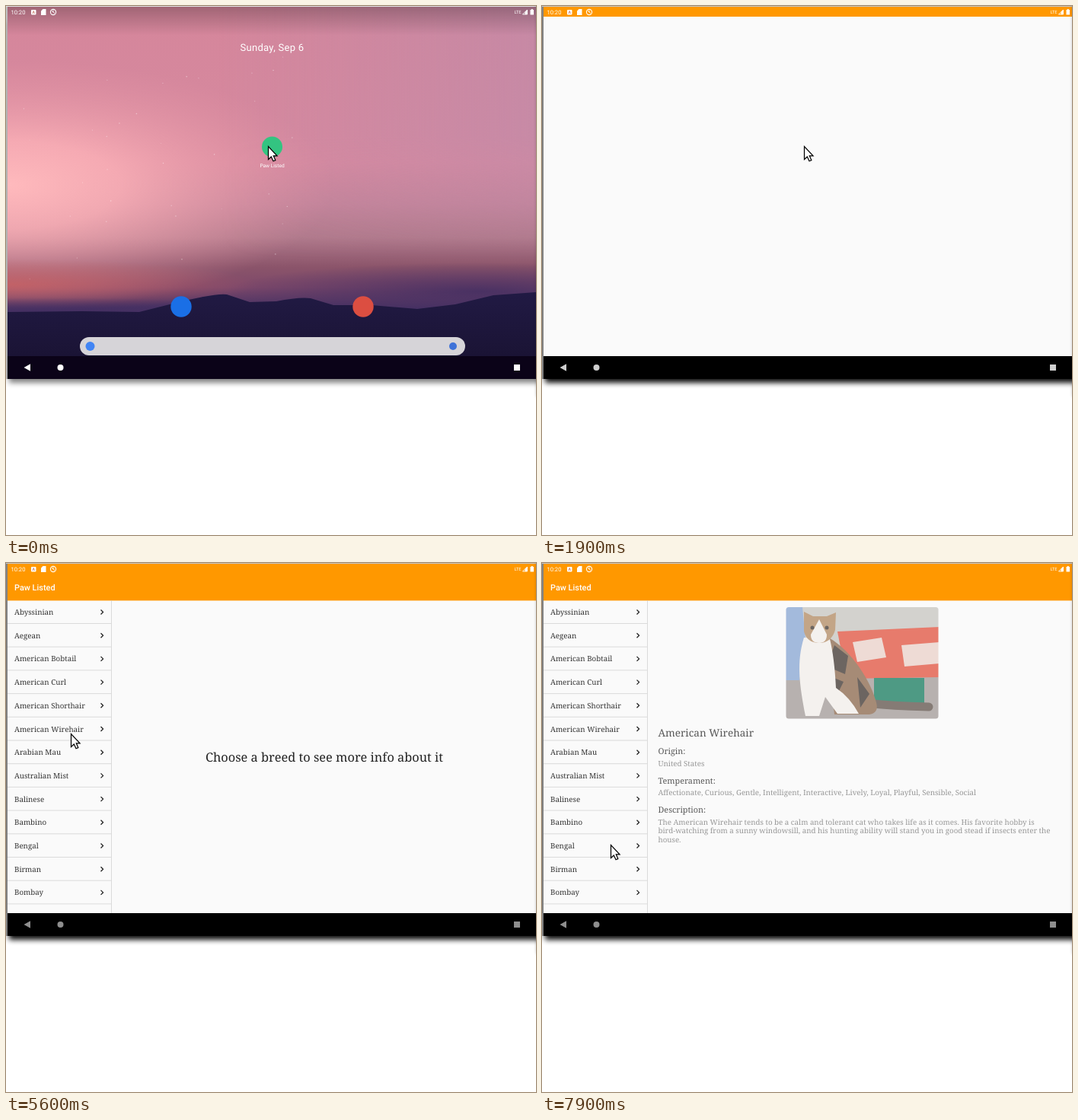
Recreate the animation shown at these times as an HTML page. Size 696 by 695 pixels, loop 8 s.

```html
<!DOCTYPE html>
<html lang="en">
<head>
<meta charset="utf-8">
<title>Paw Listed</title>
<style>
  html, body { margin: 0; width: 100%; height: 100%; overflow: hidden; background: #fff; }
  svg { display: block; width: 696px; height: 695px; }
  text { text-rendering: geometricPrecision; white-space: pre; }
  .ui { font-family: Roboto, sans-serif; }
  .serif { font-family: "Noto Serif", serif; }
  .spinner { fill: none; stroke: #64748c; stroke-width: 2.2; }
</style>
</head>
<body>
<svg viewBox="0 0 696 695">
  <defs>
    <linearGradient id="sky" x2="0" y2="1">
      <stop offset="0" stop-color="#d5869b"/>
      <stop offset=".42" stop-color="#d6899f"/>
      <stop offset=".53" stop-color="#c4849a"/>
      <stop offset=".62" stop-color="#b17a8c"/>
      <stop offset=".7" stop-color="#8b546a"/>
      <stop offset=".755" stop-color="#7d486a"/>
      <stop offset=".81" stop-color="#463163"/>
    </linearGradient>
    <linearGradient id="mauve">
      <stop offset=".4" stop-color="#b98cae" stop-opacity="0"/>
      <stop offset="1" stop-color="#b98cae" stop-opacity=".5"/>
    </linearGradient>
    <linearGradient id="mauveMask" x2="0" y2="1">
      <stop offset=".35" stop-color="#fff"/>
      <stop offset=".68" stop-color="#000"/>
    </linearGradient>
    <mask id="upper"><rect width="696" height="490" fill="url(#mauveMask)"/></mask>
    <linearGradient id="scrimFill" x2="0" y2="1">
      <stop offset="0" stop-opacity=".25"/>
      <stop offset="1" stop-opacity="0"/>
    </linearGradient>
    <linearGradient id="hill" x2="0" y2="1">
      <stop offset="0" stop-color="#211a44"/>
      <stop offset="1" stop-color="#18112f"/>
    </linearGradient>
    <radialGradient id="glow">
      <stop offset="0" stop-color="#ffbabd"/>
      <stop offset=".35" stop-color="#fdb2b8" stop-opacity=".8"/>
      <stop offset="1" stop-color="#e898a6" stop-opacity="0"/>
    </radialGradient>
    <radialGradient id="ember">
      <stop offset="0" stop-color="#cc6262" stop-opacity=".8"/>
      <stop offset="1" stop-color="#cc6262" stop-opacity="0"/>
    </radialGradient>
    <radialGradient id="dusk">
      <stop offset="0" stop-color="#452f62" stop-opacity=".9"/>
      <stop offset="1" stop-color="#452f62" stop-opacity="0"/>
    </radialGradient>
    <filter id="soft" x="-20%" y="-20%" width="140%" height="140%"><feGaussianBlur stdDeviation="3.600"/></filter>
    <filter id="edge" x="-200%" y="-5%" width="500%" height="110%"><feGaussianBlur stdDeviation="2.500"/></filter>
    <clipPath id="screen"><rect x="2" y="1" width="694" height="489"/></clipPath>
    <clipPath id="tapRow"><rect x="2" y="203" width="136" height="30"/></clipPath>
    <clipPath id="photo"><rect x="320.500" y="58" width="200" height="146.500" rx="3.500"/></clipPath>
  </defs>

  <rect id="shadow" x="4" y="20" width="720" height="475" filter="url(#soft)"/>
  <g id="frame">
    <path d="M0 0H2V490H0Z" fill="#808080"/>
    <path d="M0 0H696V1H0Z" fill="#c4c4c4"/>
  </g>

  <g clip-path="url(#screen)">
    <g id="wallpaper">
      <rect width="696" height="490" fill="url(#sky)"/>
      <rect width="696" height="490" fill="url(#mauve)" mask="url(#upper)"/>
      <ellipse cx="0" cy="235" rx="430" ry="165" fill="url(#glow)"/>
      <ellipse cx="0" cy="366" rx="330" ry="34" fill="url(#ember)"/>
      <ellipse cx="620" cy="375" rx="330" ry="38" fill="url(#dusk)"/>
      <ellipse cx="60" cy="402" rx="300" ry="19" fill="url(#dusk)"/>
      <g id="stars" fill="#fff" opacity=".45"></g>
      <path fill="url(#hill)" d="M0 402 100 401 175 402 215 392 240 386Q280 377 290 379L320 389 355 388Q385 382 400 384L430 393 480 393 540 398 590 392 640 380 696 376V490H0Z"/>
      <rect id="scrim" width="696" height="38" fill="url(#scrimFill)"/>
    </g>

    <g id="home">
      <text class="ui" x="349.500" y="58.500" font-size="13" letter-spacing=".3" text-anchor="middle" fill="#fff">Sunday, Sep 6</text>
      <circle cx="349.500" cy="185" r="13.500" fill="#33c481"/>
      <text class="ui" x="349.500" y="212" font-size="6.600" text-anchor="middle" fill="#fff">Paw Listed</text>
      <circle cx="230" cy="395" r="13.700" fill="#1a6fe6"/>
      <circle cx="469" cy="395" r="13.700" fill="#dc4e41"/>
      <rect x="97" y="435" width="506" height="24" rx="12" fill="#d6d4d8"/>
      <circle cx="110.500" cy="447" r="6" fill="#4285f4"/>
      <circle cx="587" cy="447" r="5" fill="#3f72d8"/>
    </g>

    <g id="app">
      <rect x="2" y="1" width="694" height="40" rx="13" fill="#ff9800"/>
      <rect x="2" y="14" width="694" height="446.500" fill="#fafafa"/>
      <rect x="2" y="460" width="694" height="30"/>
      <rect id="barTop" x="2" width="694" height="14" fill="#ff9800"/>
      <g id="toolbar">
        <rect x="2" y="13" width="694" height="36.400" fill="#ff9800"/>
        <text class="ui" x="11" y="36.300" font-size="10.900" font-weight="500" fill="#fff">Paw Listed</text>
      </g>
      <g id="lines" stroke="#c8c8c8" stroke-width=".62"><path d="M138.500 49V460"/></g>
      <g clip-path="url(#tapRow)"><circle id="ripple" cx="85" cy="225" r="105"/></g>
      <g id="list" class="serif" font-size="9.780" fill="#333"></g>
      <text id="hint" class="serif" x="418" y="261" font-size="16.350" text-anchor="middle" fill="#222">Choose a breed to see more info about it</text>
      <g id="details" class="serif">
        <g clip-path="url(#photo)">
          <rect x="320" y="58" width="202" height="148" fill="#c6c4bf"/>
          <path d="M320 150H522V206H320Z" fill="#a09996"/>
          <path d="M320 58H342L346 100 338 154H320Z" fill="#86a4d2"/>
          <path d="M388 90 522 84V150L400 152Z" fill="#e0503c"/>
          <path d="M408 104 446 98 452 124 414 130ZM472 108 522 104V132L476 136Z" fill="#ead0c8"/>
          <path d="M436 151H502V186H436Z" fill="#157a5c"/>
          <path d="M425 184Q460 188 508 189" fill="none" stroke="#5e5048" stroke-width="11" stroke-linecap="round"/>
          <path d="M372 96C400 108 430 150 438 180Q444 197 430 199H384Z" fill="#8a664a"/>
          <path d="M384 108 402 122 398 146 374 136ZM376 148 396 156 390 168 372 162ZM414 150 430 172 418 190Z" fill="#3c332e"/>
          <path d="M344 98C334 130 338 160 346 201H364L372 176 388 198H416Q404 176 386 164 384 124 378 100Z" fill="#f2eeea"/>
          <path d="M344 64 356 70H374L386 65 385 88Q380 105 364 105 348 105 344 90Z" fill="#b18860"/>
          <path d="M364 74 374 94Q374 105 364 105 353 105 353 94Z" fill="#f2eeea"/>
          <g fill="#3c332e"><circle cx="355" cy="85" r="2.500"/><circle cx="374" cy="85" r="2.500"/></g>
        </g>
        <text x="152.500" y="227.500" font-size="13.500" fill="#222">American Wirehair</text>
        <g font-size="10.800" fill="#222">
          <text x="152.500" y="251">Origin:</text>
          <text x="152.500" y="289.500">Temperament:</text>
          <text x="152.500" y="327.500">Description:</text>
        </g>
        <g font-size="9.760" fill="#777">
          <text x="152.500" y="267">United States</text>
          <text x="152.500" y="305.300">Affectionate, Curious, Gentle, Intelligent, Interactive, Lively, Loyal, Playful, Sensible, Social</text>
          <text x="152.500" y="343.500">The American Wirehair tends to be a calm and tolerant cat who takes life as it comes. His favorite hobby is</text>
          <text x="152.500" y="355">bird-watching from a sunny windowsill, and his hunting ability will stand you in good stead if insects enter the</text>
          <text x="152.500" y="366.500">house.</text>
        </g>
      </g>
      <g id="spinA"></g>
      <g id="spinB"></g>
    </g>

    <rect id="navBack" x="2" y="460" width="694" height="30"/>
    <g id="navKeys" fill="#fff">
      <path d="M23.500 475 32 470.300V479.700ZM667 471H675V479H667Z"/>
      <circle cx="71.500" cy="475" r="4"/>
    </g>

    <g class="ui" fill="#fff">
      <text x="6.500" y="10.800" font-size="7.600">10:20</text>
      <rect x="33" y="5" width="6.500" height="6.500" rx="1"/>
      <path d="M35 10 36.250 6.500 37.500 10" fill="none" stroke="#c77d6a" stroke-width=".9"/>
      <path d="M48.500 4H52.500V12H46V6.500Z"/>
      <circle cx="62" cy="8" r="3.600" fill="none" stroke="#fff" stroke-width="1.100"/>
      <path d="M60 6.500 64 9.500M62 5.500V8" stroke="#fff" stroke-width=".9"/>
      <text x="667.500" y="10" font-size="5.800">LTE</text>
      <path d="M678.500 11 684.500 5V11Z" fill="none" stroke="#fff" stroke-width=".9"/>
      <path d="M684.500 5V11H681.500V8Z"/>
      <path d="M688.500 5H689.800V4H691.700V5H693V11.500H688.500Z"/>
    </g>
  </g>
  <rect x="698" y="-20" width="12" height="533" opacity=".55" filter="url(#edge)"/>

  <path id="cursor" d="M.5.500V17.500L4.300 14 7 19.800 9.800 18.600 7.300 12.800H12Z" fill="#fff" stroke="#000" stroke-width="1.250"/>
</svg>

<script>
const LOOP = 8000;
const NS = 'http://www.w3.org/2000/svg';
const $ = id => document.getElementById(id);

function add(parent, tag, attrs, text) {
  const el = document.createElementNS(NS, tag);
  for (const k in attrs) el.setAttribute(k, attrs[k]);
  if (text) el.textContent = text;
  return parent.appendChild(el);
}

// steps: [time, value, easing towards the next step]
function track(el, prop, steps) {
  const all = [[0, steps[0][1]], ...steps, [LOOP, steps[steps.length - 1][1]]];
  el.animate(
    all.map(([t, v, easing = 'linear']) => ({ offset: t / LOOP, [prop]: v, easing })),
    { duration: LOOP, iterations: Infinity });
}
const fade = (id, ...steps) => track($(id), 'opacity', steps);
const pop = (id, t) => fade(id, [t, 0], [t, 1]);

// Wallpaper specks
let seed = 7;
const rnd = () => (seed = seed * 16807 % 2147483647) / 2147483647;
for (let i = 0; i < 34; i++)
  add($('stars'), 'circle', { cx: rnd() * 400, cy: 50 + rnd() * 310, r: .4 + rnd() * .4 });

// Breed list falling into place row by row
const breeds = ['Abyssinian', 'Aegean', 'American Bobtail', 'American Curl', 'American Shorthair',
  'American Wirehair', 'Arabian Mau', 'Australian Mist', 'Balinese', 'Bambino', 'Bengal',
  'Birman', 'Bombay'];
const ROW = 30.7, DROP = 500;
breeds.forEach((name, i) => {
  const y = 64.5 + ROW * i, start = 3850 + DROP * .15 * i;
  const row = add($('list'), 'g', {});
  row.style.transformOrigin = `70px ${y}px`;
  add(row, 'text', { x: 11, y: y + 3.5 }, name);
  add(row, 'path', { d: `M124.500 ${y - 3}l3 3-3 3`, fill: 'none', stroke: '#222', 'stroke-width': 1.3 });
  add($('lines'), 'path', { d: `M2 ${y + 15}H138` });
  track(row, 'opacity', [[start, 0], [start + DROP, 1]]);
  track(row, 'transform', [
    [start, 'translate(0px,-6.200px) scale(1.050)', 'cubic-bezier(.5,1,.89,1)'],
    [start + DROP, 'translate(0px,0px) scale(1)']]);
});

// Indeterminate ring, widest at time `full` with its tail at `angle`
function spinner(id, cx, cy, full, angle) {
  const period = LOOP / 6, sweep = 73, turn = 97.2;
  const ring = add($(id), 'circle', { cx, cy, r: 9.7, pathLength: 100, class: 'spinner' });
  const opts = { duration: period, iterations: Infinity, delay: full - period / 2 - LOOP };
  ring.style.transformOrigin = `${cx}px ${cy}px`;
  ring.animate({ transform: [0, turn].map(a => `rotate(${a + angle - turn / 2}deg)`) }, opts);
  ring.animate({
    strokeDasharray: ['5 95', '78 22', '5 95'],
    strokeDashoffset: ['0', '0', `${-sweep}`],
    easing: 'cubic-bezier(.4,0,.2,1)'
  }, opts);
}
spinner('spinA', 349.5, 237, 2500, 2);
spinner('spinB', 420.5, 254.5, 6800, 50);

// Launch
fade('shadow', [700, .5], [800, .95]);
fade('frame', [700, .5], [800, 1]);
fade('home', [1000, 1], [1250, 0]);
fade('scrim', [1000, 1], [1250, 0]);
fade('app', [1000, 0], [1100, 1]);
$('app').style.transformOrigin = '355px 201px';
track($('app'), 'transform', [
  [1000, 'scale(.04)'], [1100, 'scale(.4)'], [1200, 'scale(.74)'],
  [1300, 'scale(.904)'], [1400, 'scale(.97)'], [1500, 'scale(1)']]);
pop('barTop', 1500);
track($('navBack'), 'fill', [[1000, '#0b0318'], [1300, '#020118'], [1500, '#000']]);
fade('navKeys', [1500, 1], [2100, .72], [2500, .68], [3100, .56]);

// Loading, list, selection, details
pop('toolbar', 2300);
fade('spinA', [2300, 0], [2300, 1], [3600, 1], [3750, 0]);
fade('lines', [3600, 0], [4600, 1]);
fade('hint', [3600, 0], [4600, 1], [5900, 1], [6200, 0]);
fade('ripple', [5900, 0], [5900, .12], [6200, .12], [6500, 0]);
track($('ripple'), 'r', [[5900, '12px'], [6300, '105px']]);
fade('spinB', [6100, 0], [6250, 1], [7200, 1], [7350, 0]);
fade('details', [7300, 0], [7900, .75], [8000, .87]);

const at = (x, y) => `translate(${x}px,${y}px)`;
track($('cursor'), 'transform', [
  [4900, at(344, 184), 'ease-in-out'], [5600, at(85, 224)],
  [6500, at(85, 224), 'ease-in'], [6800, at(97.5, 250), 'ease-in-out'],
  [7600, at(90, 370)]]);
</script>
</body>
</html>
```
